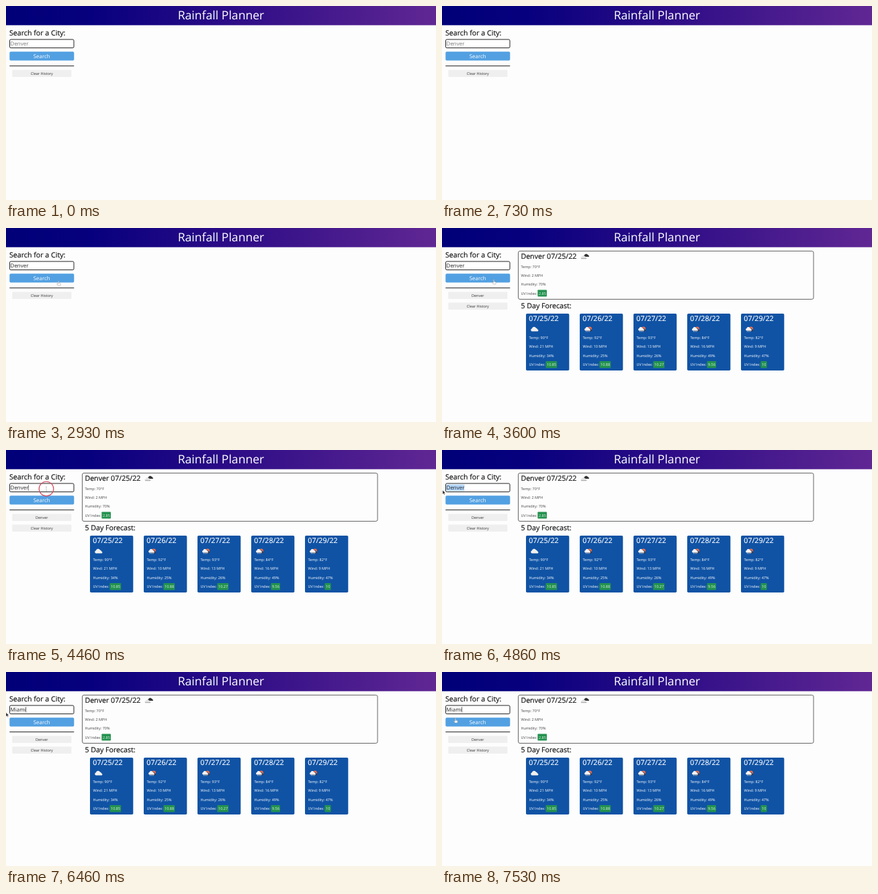
An HTML page that plays this animation: 640x290 px, repeating every 8000 ms.

```html
<!DOCTYPE html>
<html lang="en">
<head>
<meta charset="utf-8">
<title>Rainfall Planner</title>
<style>
  html, body { margin: 0; width: 100%; height: 100%; overflow: hidden; background: #fdfdfd; }
  svg { display: block; width: 640px; height: 290px; font-family: "Open Sans", "Noto Sans", sans-serif; }
  text { white-space: pre; text-rendering: geometricPrecision; }
  .head { font-size: 10.65px; stroke-width: .16px; }
  .dark { fill: #111; stroke: #111; }
  .light { fill: #fff; stroke: #fff; }
  .small { font-size: 5.5px; }
  .field { font-size: 7.95px; }
</style>
</head>
<body>
<svg viewBox="0 0 640 290">
  <defs>
    <linearGradient id="bar">
      <stop offset="0" stop-color="#000078"/>
      <stop offset=".2" stop-color="#07007e"/>
      <stop offset=".5" stop-color="#2a0b86"/>
      <stop offset="1" stop-color="#602793"/>
    </linearGradient>
    <path id="cloud" d="M2 8a2.2 2.2 0 0 1 .3-4.2A3.3 3.3 0 0 1 8.4 3a2.3 2.3 0 0 1 2 2.2A1.5 1.5 0 0 1 11 8z"/>
    <g id="overcast">
      <use href="#cloud" transform="translate(4.6 .2) scale(.72 .62)" fill="#333"/>
      <use href="#cloud" transform="translate(0 2.6) scale(.82 .7)" fill="#e4e4e4"/>
      <path d="M1 7.9H9" stroke="#555" stroke-width=".5"/>
    </g>
    <use id="cloudy" href="#cloud" fill="#f2f0ee"/>
    <g id="rain">
      <circle cx="8.4" cy="4" r="2.9" fill="#ec6e4c"/>
      <use href="#cloud" transform="translate(3.4 2.2) scale(.7)" fill="#3a3a48"/>
      <use href="#cloud" transform="translate(0 .6) scale(.8)" fill="#f4f2f2"/>
      <path d="M3.4 7.4l-.6 1.5M5.6 7.4L5 8.9M7.8 7.4l-.6 1.5" stroke="#f4f2f2" stroke-width=".7"/>
    </g>
  </defs>

  <rect width="640" height="28.7" fill="url(#bar)"/>
  <text x="320" y="19.8" font-size="17.6" fill="#fff" text-anchor="middle">Rainfall Planner</text>

  <text class="head dark" x="5" y="44.3">Search for a City:</text>
  <rect x="5.5" y="50" width="95.5" height="12.6" rx="1.8" fill="#fff" stroke="#222" stroke-width="1"/>
  <rect id="selection" y="51.6" height="9.6" fill="#b3d7fe"/>
  <text id="entry" class="field" x="6.6" y="59.2"></text>
  <rect id="caret" y="52.2" width=".6" height="8.6" fill="#222"/>
  <rect x="5.3" y="68.2" width="96" height="13.4" rx="1.8" fill="#52a0e2"/>
  <text class="field" x="53.2" y="77.7" fill="#fff" text-anchor="middle">Search</text>
  <path d="M5.3 89.6H101.3" stroke="#222"/>

  <g id="history"></g>
  <g id="results"></g>

  <circle id="ring" r="10.8" fill="none" stroke="#d2495c" stroke-width="1.2"/>
  <g id="pointer" stroke-linejoin="round">
    <path id="arrow" d="M0 0V6.2L1.5 4.9 2.5 7.1 3.5 6.6 2.5 4.5H4.4Z" fill="#222" stroke="#fff" stroke-width=".5"/>
    <path id="hand" d="M-.5-3.4q.6-.6 1.1 0V-.8l2.2.6q.6.2.5 1l-.5 2.2H-.6L-2.4.7q0-.8.8-.5l1.1.7z" fill="#fff" stroke="#888" stroke-width=".45"/>
    <path id="beam" d="M-1-3h2M0-3v6M-1 3h2" fill="none" stroke="#999" stroke-width=".5"/>
  </g>
</svg>
<script>
const LOOP = 8000, TICK = 200 / 3;
const el = id => document.getElementById(id);
const text = (x, y, str, cls, fill = "", extra = "") =>
  `<text x="${x}" y="${y}" class="${cls}" ${fill && `fill="${fill}"`} ${extra}>${str}</text>`;
const show = (node, on) => node.setAttribute("visibility", on ? "visible" : "hidden");

// Four weather lines ending in a green UV badge
function readings(x, y, [temp, wind, humidity, uv], fill) {
  const lines = [`Temp: ${temp}°F`, `Wind: ${wind} MPH`, `Humidity: ${humidity}%`, "UV Index:"];
  const badgeWidth = { 2: 9.2, 4: 13.6, 5: 16.8 }[uv.length];
  return lines.map((s, i) => text(x, y + i * 13.35, s, "small", fill)).join("") +
    `<rect x="${x + 25}" y="${y + 32.9}" width="${badgeWidth}" height="10.2" rx=".8" fill="#23924f"/>` +
    text(x + 26.6, y + 40.05, uv, "small", "#e4f3e8");
}

function card([day, ...data], i) {
  const x = 125 + i * 80;
  return `<rect x="${x}" y="128" width="64.3" height="85" rx="1.8" fill="#1053a5"/>` +
    text(x + 4.3, 139, `07/${day}/22`, "head light") +
    `<use href="#${i ? "rain" : "cloudy"}" x="${x + 6.6}" y="146.4"/>` +
    readings(x + 4.4, 166.1, data, "#fff");
}

const days = [
  [25, 90, 21, 34, "10.85"], [26, 92, 10, 25, "10.88"], [27, 93, 13, 26, "10.27"],
  [28, 84, 16, 49, "9.56"], [29, 82, 9, 47, "10"]
];
el("results").innerHTML =
  `<rect x="113.5" y="34.5" width="439.5" height="72" rx="2.5" fill="none" stroke="#555" stroke-width=".9"/>` +
  text(117.4, 45.8, "Denver 07/25/22", "head dark") +
  `<use href="#overcast" x="206" y="37.8"/>` +
  readings(117.4, 59.5, [70, 2, 70, "2.85"], "#444") +
  text(117.4, 120.2, "5 Day Forecast:", "head dark") +
  days.map(card).join("");

const historyButton = (y, label) =>
  `<g transform="translate(0 ${y})"><rect x="9.3" width="88" height="10.5" rx=".8" fill="#efefef"/>` +
  text(53.3, 7.2, label, "small", "#333", 'text-anchor="middle"') + "</g>";
const historyBefore = historyButton(95.6, "Clear History");
const historyAfter = historyButton(95.6, "Denver") + historyButton(111.6, "Clear History");

// [time, field content]
const typing = [
  [0, ""], [1400, "D"], [1530, "De"], [1600, "Den"], [1730, "Denv"], [2000, "Denve"], [2200, "Denver"],
  [5330, ""], [6000, "M"], [6130, "Mi"], [6200, "Mia"], [6330, "Miam"], [6460, "Miami"]
];
// Intervals in which the caret is lit
const caretOn = [[260, 730], [1200, 2660], [4260, 4530], [5330, 5800], [6000, 7000], [7500, LOOP]];
const ringOn = [[3260, 3460], [4330, 4860]];
const pointerOn = [[2660, 6730], [7200, LOOP]];
// [time, x, y]
const path = [
  [2660, 86, 105], [2930, 78, 83], [3130, 77, 81], [3600, 77, 81], [3860, 68, 67], [4130, 61, 58],
  [4460, 61, 58], [4860, 1, 60], [5000, 0, 60.5], [6730, 0, 60.5], [7200, 8, 67], [7500, 20, 73]
];

const within = (spans, t) => spans.some(([a, b]) => t >= a && t < b);
function pointerAt(t) {
  const i = path.findIndex(p => p[0] > t);
  if (i <= 0) return (i ? path[path.length - 1] : path[0]).slice(1);
  const [a, b] = [path[i - 1], path[i]], k = (t - a[0]) / (b[0] - a[0]);
  return [a[1] + (b[1] - a[1]) * k, a[2] + (b[2] - a[2]) * k];
}

const entry = el("entry");
let lastHistory;
function draw(t) {
  const value = typing.filter(s => s[0] <= t).pop()[1];
  const content = value || "Denver";
  if (entry.textContent !== content) entry.textContent = content;
  entry.setAttribute("fill", value ? "#222" : "#777");
  const end = 6.6 + (value ? entry.getComputedTextLength() : 0);
  el("caret").setAttribute("x", end);
  show(el("caret"), within(caretOn, t));

  const [x, y] = pointerAt(t);
  const from = Math.max(6.6, Math.min(x, end));
  el("selection").setAttribute("x", from);
  el("selection").setAttribute("width", t >= 4460 && t < 5330 ? end - from : 0);

  const history = t >= 3460 ? historyAfter : historyBefore;
  if (history !== lastHistory) el("history").innerHTML = lastHistory = history;
  show(el("results"), t >= 3530);

  const place = `translate(${x} ${y})`;
  el("pointer").setAttribute("transform", place);
  el("ring").setAttribute("transform", place);
  show(el("ring"), within(ringOn, t));
  const inside = x > 5 && x < 101;
  const shape = inside && y > 50 && y < 63 ? "beam" : inside && y > 66 && y < 84 ? "hand" : "arrow";
  for (const id of ["arrow", "hand", "beam"]) show(el(id), id === shape && within(pointerOn, t));
}

const start = performance.now();
function frame(now) {
  const t = Math.max(0, now - start) % LOOP;
  draw(Math.floor((t + 7) / TICK) * TICK);
  requestAnimationFrame(frame);
}
draw(0);
requestAnimationFrame(frame);
</script>
</body>
</html>
```
